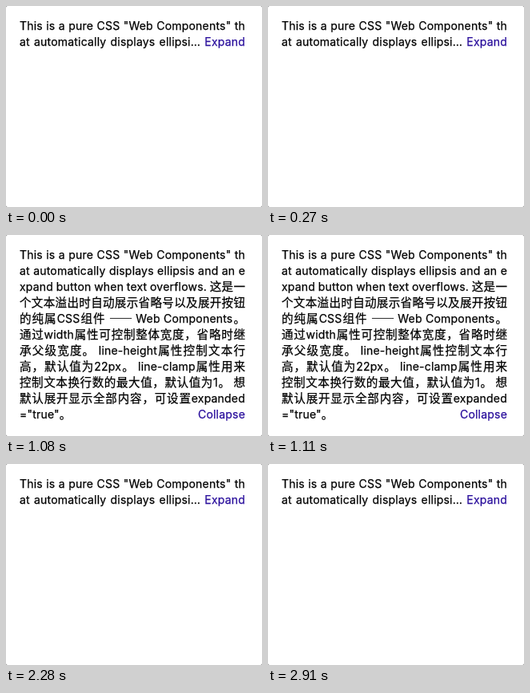
Recreate the animation shown at these times as an HTML page. Size 320 px wide and 252 px high, loop 3.3 s.

```html
<!DOCTYPE html>
<html lang="zh-CN">
<head>
<meta charset="utf-8">
<title>Text clamp</title>
<style>
  html, body { margin: 0; width: 100%; height: 100%; overflow: hidden; background: #777; }
  #stage { position: relative; width: 320px; height: 252px; background: #fff; border-radius: 2px; overflow: hidden; }
  .line {
    position: absolute; left: 17px; width: 282px; height: 20px;
    font: 14px/20px Inter, "Noto Sans CJK SC", sans-serif;
    letter-spacing: .2px; word-spacing: -.8px;
    -webkit-text-stroke: .25px currentColor;
    color: #000; white-space: nowrap; text-align: justify; text-align-last: justify;
  }
  .cjk { font: 14.55px/0 "Noto Sans CJK SC", "Noto Sans CJK", sans-serif; letter-spacing: 0; }
  .short { width: 226px; }
  .start { text-align-last: left; }
  .link { text-align-last: right; color: #2a0f9c; }
</style>
</head>
<body>
<div id="stage">
  <div id="shared"></div>
  <div id="closed"></div>
  <div id="open"></div>
</div>
<script>
const LOOP = 3300, OPEN_AT = 1080, CLOSE_AT = 2280;
const TOP = 15, PITCH = 20;

const wide = /([\u2014\u2e80-\uffef]+)/;

function line(parent, row, text, kind = '') {
  const el = document.createElement('div');
  el.className = 'line ' + kind;
  el.style.top = TOP + row * PITCH + 'px';
  for (const part of text.split(wide)) {
    if (!part) continue;
    if (wide.test(part)) {
      const span = document.createElement('span');
      span.className = 'cjk';
      span.textContent = part;
      el.append(span);
    } else {
      el.append(part);
    }
  }
  document.getElementById(parent).append(el);
}

line('shared', 0, 'This is a pure CSS "Web Components" th');

line('closed', 1, 'at automatically displays ellipsi…', 'short');
line('closed', 1, 'Expand', 'link');

[
  'at automatically displays ellipsis and an e',
  'xpand button when text overflows. 这是一',
  '个文本溢出时自动展示省略号以及展开按钮',
  '的纯属CSS组件 —— Web Components。',
  '通过width属性可控制整体宽度，省略时继',
  '承父级宽度。 line-height属性控制文本行',
  '高，默认值为22px。 line-clamp属性用来',
  '控制文本换行数的最大值，默认值为1。 想',
  '默认展开显示全部内容，可设置expanded'
].forEach((text, i) => line('open', i + 1, text));
line('open', 10, '="true"。', 'start');
line('open', 10, 'Collapse', 'link');

// Hard switch between the two states
function toggle(id, idle, active) {
  const steps = [[0, idle], [OPEN_AT, active], [CLOSE_AT, idle], [LOOP, idle]];
  document.getElementById(id).animate(
    steps.map(([t, opacity]) => ({ offset: t / LOOP, opacity, easing: 'step-end' })),
    { duration: LOOP, iterations: Infinity }
  );
}
toggle('closed', 1, 0);
toggle('open', 0, 1);
</script>
</body>
</html>
```
